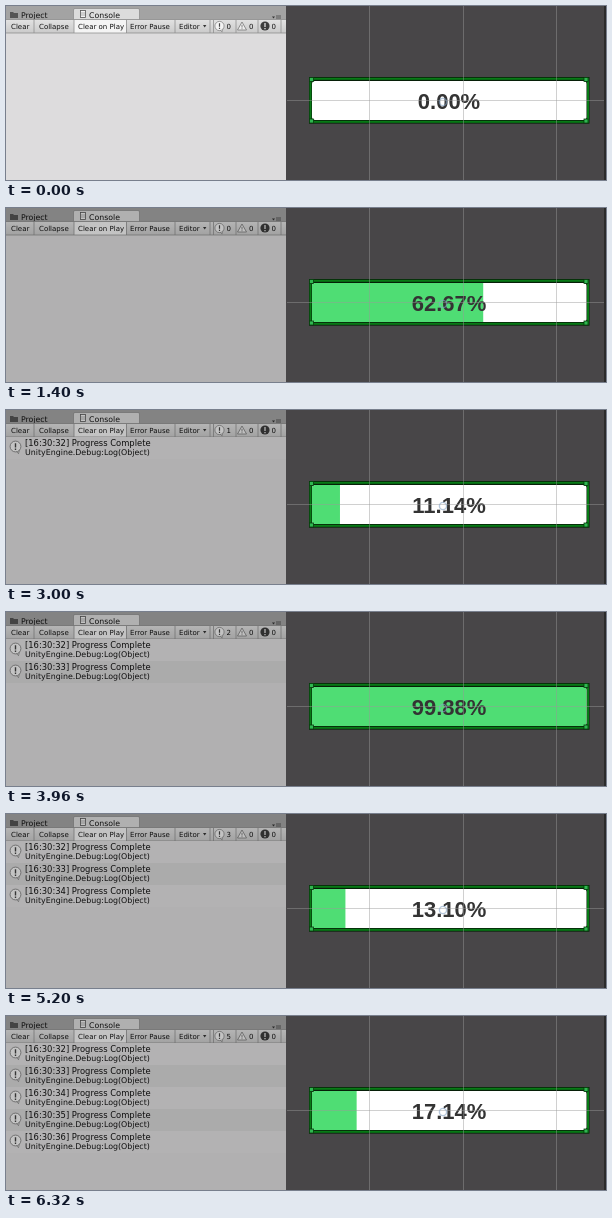
These frames come from a looping animation (600 px wide and 174 px high, 6.36 s). An HTML page:

```html
<!DOCTYPE html>
<html>
<head>
<meta charset="utf-8">
<style>
html, body { margin: 0; width: 100%; height: 100%; overflow: hidden; background: #484648; }
svg { display: block; }
text { font-family: "DejaVu Sans", Verdana, sans-serif; fill: #111; white-space: pre; }
.tool { font-size: 7px; }
.tab { font-size: 7.8px; }
#percent { font: bold 22px "Liberation Sans", Arial, sans-serif; fill: #333; text-anchor: middle; }
</style>
</head>
<body>
<svg width="600" height="174" viewBox="0 0 600 174">
  <defs>
    <linearGradient id="toolFill" x2="0" y2="1">
      <stop offset="0" stop-color="#e2e2e2"/><stop offset="1" stop-color="#cacaca"/>
    </linearGradient>
    <g id="bubble">
      <path d="M0 4L3 7.2L4 3Z" fill="#eee" stroke="#777" stroke-width=".7"/>
      <circle r="5.4" fill="#f4f4f4" stroke="#777" stroke-width=".8"/>
      <path d="M0-3.2V1M0 2V3.4" stroke="#444" stroke-width="1.4"/>
    </g>
    <clipPath id="inside"><rect x="306" y="75" width="274.5" height="39" rx="3"/></clipPath>
  </defs>

  <!-- console -->
  <rect width="280" height="174" fill="#dddcdd"/>
  <rect width="280" height="14" fill="#a3a3a3"/>
  <path d="M67.5 14V4Q67.5 2.5 69 2.5H132Q133.5 2.5 133.5 4V14Z" fill="#dcdcdc" stroke="#808080" stroke-width=".6"/>
  <path d="M4 6H7L8 7H12V12H4Z" fill="#555"/>
  <rect x="74.5" y="4.5" width="5" height="7" fill="#f4f4f4" stroke="#555" stroke-width=".8"/>
  <path d="M75 7H79M75 9H79" stroke="#777" stroke-width=".6"/>
  <text class="tab" x="15" y="11.5">Project</text>
  <text class="tab" x="83" y="11.5">Console</text>
  <path d="M266 10.5H269L267.5 12.5Z" fill="#333"/>
  <path d="M270 10H275M270 12H275" stroke="#444" stroke-width=".8"/>
  <rect y="13.5" width="280" height="13.5" fill="url(#toolFill)"/>
  <rect x="68" y="14" width="52" height="13" fill="#f4f4f4"/>
  <path d="M0 13.5H280M0 27H280" stroke="#858585" stroke-width=".7"/>
  <path d="M28 14V27M68 14V27M120.5 14V27M169 14V27M204 14V27M207.5 14V27M230 14V27M252 14V27M275 14V27" stroke="#909090" stroke-width=".8"/>
  <g id="tools"></g>
  <path d="M197 19H200.4L198.7 21.4Z" fill="#333"/>
  <use href="#bubble" transform="translate(213.5 20) scale(.85)"/>
  <path d="M231.5 24L236 16L240.5 24Z" fill="#eee" stroke="#777" stroke-width=".8"/>
  <path d="M236 18.8V21.6M236 22.3V23.2" stroke="#666" stroke-width=".8"/>
  <circle cx="259" cy="20" r="4.6" fill="#3c3c3c"/>
  <path d="M259 17V21M259 22V23.2" stroke="#eee" stroke-width="1.2"/>
  <g id="logs"></g>
  <rect id="tint" width="280" height="174" opacity=".2"/>

  <!-- scene -->
  <rect x="598" width="2" height="174" fill="#2b2b2b"/>
  <rect x="303" y="71" width="280.5" height="46.6" fill="#061f08"/>
  <rect x="304.5" y="72.8" width="277.5" height="43" fill="none" stroke="#087a16" stroke-width="2"/>
  <g clip-path="url(#inside)">
    <rect x="303" y="72" width="281" height="46" fill="#fff"/>
    <rect id="fill" x="303" y="72" height="46" fill="#4fdd74"/>
  </g>
  <text id="percent" x="443" y="103"></text>
  <path d="M363.5 0V174M457.5 0V174M550.5 0V174M281 94.5H598" stroke="#999" stroke-opacity=".46"/>
  <circle cx="437" cy="96" r="3.6" fill="none" stroke="#86a3c4" stroke-opacity=".6" stroke-width="1.4"/>
  <g id="handles" fill="#2fb750" stroke="#063b0c" stroke-width=".8"></g>
</svg>
<script>
const LOOP = 6360, STEP = 40, TINT_AT = 600;
const starts = [727.15, 1800.86, 2879.5, 3961.3, 5059.05, 6134.9, 7215];
const logTimes = [1900, 3040, 4100, 5240, 6260];
const $ = id => document.getElementById(id);

const label = (x, text, id = "") => `<text class="tool" x="${x}" y="22.7" id="${id}">${text}</text>`;
$("tools").innerHTML = label(5, "Clear") + label(33, "Collapse") + label(72, "Clear on Play") +
  label(124, "Error Pause") + label(173, "Editor") + label(220.5, "0", "count") +
  label(243, "0") + label(265.5, "0");

$("logs").innerHTML = logTimes.map((_, i) => `<g transform="translate(0 ${22 * i})">
  <rect y="27" width="280" height="22" fill="${i % 2 ? "#d6d5d6" : "#dfdedf"}"/>
  <use href="#bubble" x="9.5" y="36.5"/>
  <text x="19" y="36.2" font-size="8.4">[16:30:${32 + i}] Progress Complete</text>
  <text x="19" y="44.7" font-size="7.9">UnityEngine.Debug:Log(Object)</text></g>`).join("");
const logs = [...$("logs").children];

$("handles").innerHTML = [305.5, 580].flatMap(x => [73.5, 115].map(y =>
  `<rect x="${x - 2}" y="${y - 2}" width="4" height="4"/>`)).join("");

function progressAt(t) {
  const i = starts.findLastIndex(s => s <= t);
  return i < 0 ? 0 : 100 * (t - starts[i]) / (starts[i + 1] - starts[i]);
}

function draw() {
  const t = Math.floor(performance.now() % LOOP / STEP) * STEP;
  const progress = progressAt(t);
  const count = logTimes.filter(s => s <= t).length;
  $("fill").setAttribute("width", 2.78 * progress);
  $("percent").textContent = progress.toFixed(2) + "%";
  $("count").textContent = count;
  $("tint").style.display = t < TINT_AT ? "none" : "";
  logs.forEach((log, i) => log.style.display = i < count ? "" : "none");
  requestAnimationFrame(draw);
}
draw();
</script>
</body>
</html>
```
